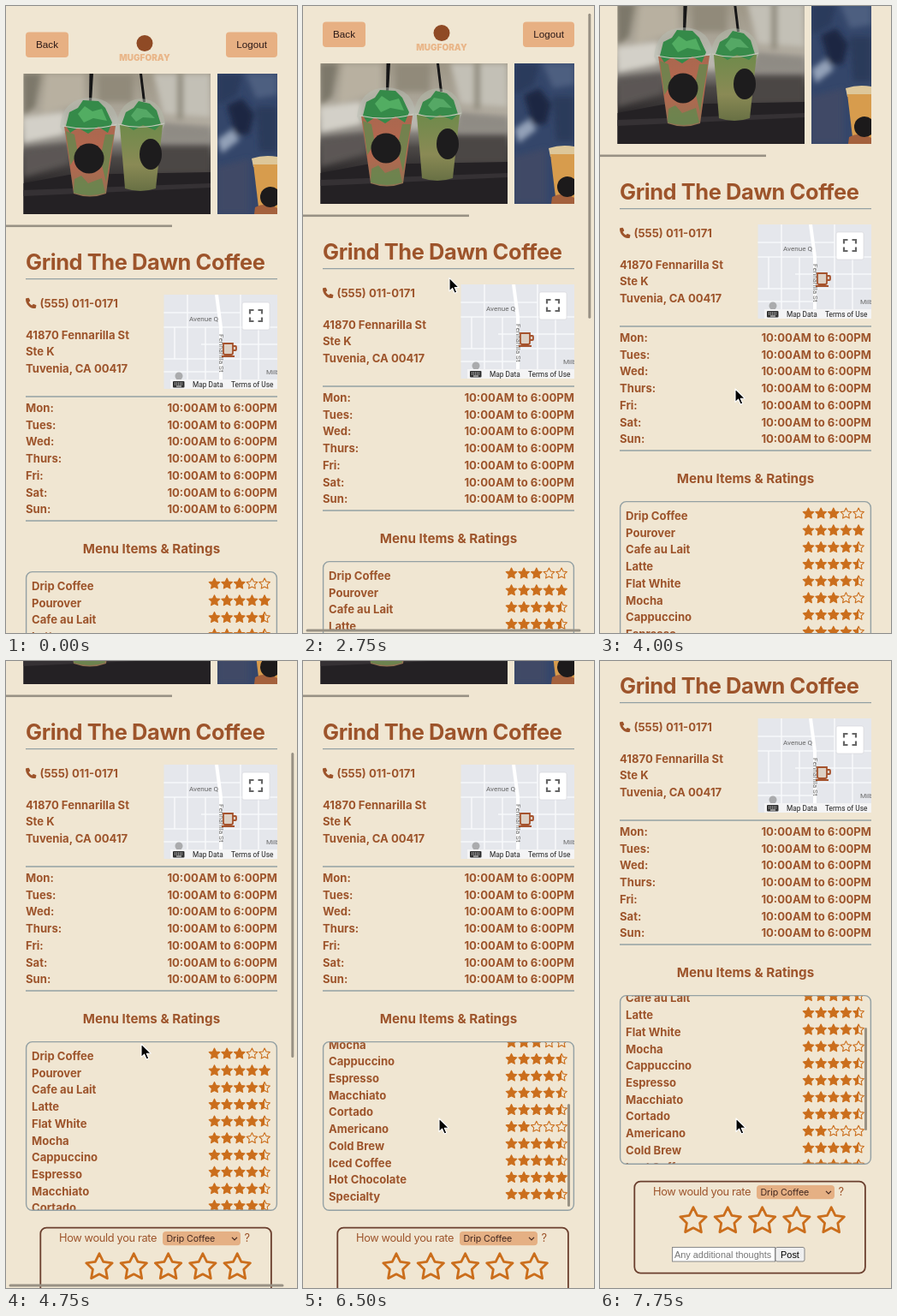
An HTML page for the animation above (8 s loop, 340 by 732 pixels).

```html
<!DOCTYPE html>
<html lang="en">
<head>
<meta charset="utf-8">
<title>Coffee shop page</title>
<style>
  html, body { margin: 0; width: 100%; height: 100%; overflow: hidden; background: #f0e6d2; }
  svg { display: block; width: 340px; height: 732px; }
  text { font: 700 13.1px Inter, sans-serif; fill: #9d542b; }
  .title { font-size: 25.4px; letter-spacing: -.4px; }
  .head { font-size: 15.2px; }
  .ask { font-weight: 400; font-size: 12.8px; letter-spacing: -.35px; }
  .form { font: 11.7px "Liberation Sans", Arial, sans-serif; fill: #2c1a18; }
  .small { font: 8.35px Roboto, sans-serif; fill: #222; }
  .road { font-size: 8.1px; fill: #666; }
  .mid { text-anchor: middle; }
  .end { text-anchor: end; }
  .rule { stroke: #93a0a3; stroke-width: 1.4; fill: none; }
  .bar { fill: #989184; }
</style>
</head>
<body>
<svg id="stage" viewBox="0 0 340 732"></svg>
<script>
const text = (x, y, s, cls = '', more = '') => `<text x="${x}" y="${y}" class="${cls}" ${more}>${s}</text>`;
const rect = (x, y, w, h, fill, more = '') => `<rect x="${x}" y="${y}" width="${w}" height="${h}" fill="${fill}" ${more}/>`;
const circle = (x, y, r, fill) => `<circle cx="${x}" cy="${y}" r="${r}" fill="${fill}"/>`;
const path = (d, fill, more = '') => `<path d="${d}" fill="${fill}" ${more}/>`;
const rule = y => path(`M23 ${y}H317`, 'none', 'class="rule"');
const clip = (id, shape) => `<clipPath id="${id}">${shape}</clipPath>`;

const ORANGE = '#cb6e1c';

// The first `points` corners of a star, starting at the top and going round by the left
function starPath(x, y, r, points = 10) {
  let d = '';
  for (let i = 0; i < points; i++) {
    const a = -Math.PI / 2 - i * Math.PI / 5, k = i % 2 ? r * .5 : r;
    d += (i ? 'L' : 'M') + (x + k * Math.cos(a)).toFixed(2) + ' ' + (y + k * Math.sin(a)).toFixed(2);
  }
  return d + 'Z';
}
function star(x, y, r, width, fill = 1) {
  const line = `stroke="${ORANGE}" stroke-width="${width}" stroke-linejoin="round"`;
  return path(starPath(x, y, r), fill === 1 ? ORANGE : 'none', line) +
    (fill === .5 ? path(starPath(x, y, r, 6), ORANGE) : '');
}

function photos() {
  const first = rect(20, 79, 219, 164, 'url(#cabin)') +
    '<g filter="url(#soft)">' +
    path('M20 79H40L34 118L20 128Z', '#7d786a') +
    path('M46 79H92V112L42 126Z', '#b8b0a0') +
    path('M108 79H148V112H108Z', '#918a7a') +
    path('M172 79H239V130L184 126Z', '#c3c0b6') +
    path('M200 79H207V132H200Z', '#8f8a7c') +
    path('M20 130L68 124V150L20 160Z', '#d3d0c8') +
    path('M122 130H138V156H122Z', '#b9b6ae') +
    path('M182 136L239 142V156H182Z', '#8f8b84') +
    path('M20 168L74 160V184L20 200Z', '#5b5755') +
    path('M174 164H239V196H174Z', '#4c4745') + '</g>' +
    path('M20 207L74 197L239 194V243H20Z', '#242124') +
    path('M20 215L239 207V212L20 222Z', '#353134') +
    path('M97.5 79H102L100 112H97Z', '#161617') +
    path('M156 79H159L163 112H160Z', '#161617') +
    path('M63 141Q66 108 98 107Q129 108 132 139L128 148H67Z', '#b7beb3', 'opacity=".5"') +
    path('M68 140L79 219Q98 226 117 219L128 140Z', 'url(#pink)') +
    path('M70 146L75 186L84 172L80 150ZM116 150L110 178L117 206L126 150ZM80 202L88 198L96 207L112 201L116 218Q98 224 79 218Z', '#5f8a4e', 'opacity=".75"') +
    path('M70 140L74 124L84 119L90 110L108 111L116 119L124 136L119 148L108 141L96 149L84 142L75 148Z', '#358a49') +
    path('M84 126L92 117L101 123L112 120L118 134L102 131L91 136Z', '#52ad62') +
    path('M66 140Q98 147 130 138', 'none', 'stroke="#c9cbc0" stroke-width="1.2"') +
    path('M129 139Q133 110 157 108Q182 109 186 137L182 146H133Z', '#b3bbac', 'opacity=".5"') +
    path('M133 139L139 213Q157 219 175 213L183 139Z', 'url(#olive)') +
    path('M135 138L140 124L149 119L155 111L168 114L176 122L181 138L174 145L160 139L149 145L141 140Z', '#388b4b') +
    path('M146 128L153 119L164 121L174 131L160 130L152 135Z', '#55a865') +
    path('M131 138Q157 145 185 137', 'none', 'stroke="#c6c9bb" stroke-width="1.2"') +
    circle(97, 178, 17.5, '#1d1c1d') + '<ellipse cx="169" cy="173" rx="13" ry="18" fill="#1d1c1d"/>';
  const second = rect(247, 79, 70, 164, '#34466a') +
    '<g filter="url(#soft)">' +
    path('M247 79H276L270 104L247 116Z', '#2a3a5c') +
    path('M280 79H317V104L292 108Z', '#4d5f80') +
    path('M258 116L276 108L290 126L284 150L268 150Z', '#1c2743') +
    path('M292 118H317V170H296Z', '#2c3a5a') +
    path('M247 156L264 144L273 156L252 172Z', '#93a1b8') +
    path('M247 188L284 178V243H247Z', '#3f4a66') + '</g>' +
    path('M287 178Q302 173 317 176V188H289Z', '#ddc79a') +
    path('M289 185H317V243H296Z', '#d79c4d') +
    path('M291 235Q304 228 317 236V243H290Z', '#a4613d') + circle(309, 223, 12, '#1c1a1b');
  return `<g clip-path="url(#p1)">${first}</g><g clip-path="url(#p2)">${second}</g>`;
}

function map() {
  const corner = (x, y, dx, dy) => `M${x} ${y + 4.5 * dy}V${y}H${x + 4.5 * dx}`;
  return '<g clip-path="url(#mapBox)">' + rect(184, 337, 133, 110, '#e5e7ec') +
    path('M184 358H274M184 375H317M184 412H317M228 395H317M212 337V447M233 375V437M274 337V447M295 375V437M197 375V412M184 427H250',
      'none', 'stroke="#f8f9fb" stroke-width="1.5"') +
    path('M246 337L251 375V447', 'none', 'stroke="#fff" stroke-width="4"') +
    circle(202, 432, 4.5, '#aaabad') +
    text(214, 368, 'Avenue Q', 'small road') +
    text(0, 0, 'Fennarilla St', 'small road', 'transform="translate(248.5 383) rotate(90)"') +
    text(304, 430, 'Milbren', 'small road') +
    path('M254 394H265V405Q265 407 263 407H256Q254 407 254 405ZM265 397H268Q269 397 269 398V401Q269 402 268 402H265M252 409H267',
      '#ddd0c4', 'stroke="#a5522c" stroke-width="1.8"') +
    rect(276, 346, 32, 32, '#fff', 'rx="2" stroke="#d5d6d8" stroke-width=".6"') +
    path(corner(285, 355, 1, 1) + corner(299, 355, -1, 1) + corner(285, 368, 1, -1) + corner(299, 368, -1, -1),
      'none', 'stroke="#666" stroke-width="2.2"') +
    rect(192, 436, 125, 11, '#f4f4f5') +
    rect(195, 438, 13.5, 7.5, '#333', 'rx="1"') +
    path('M197 440H207M197 442H207', 'none', 'stroke="#eee" stroke-dasharray="1 1"') +
    path('M199 444H205', 'none', 'stroke="#eee"') +
    text(218, 444.7, 'Map Data', 'small') + text(263, 444.7, 'Terms of Use', 'small') + '</g>';
}

const days = ['Mon', 'Tues', 'Wed', 'Thurs', 'Fri', 'Sat', 'Sun'];
const menu = ['Drip Coffee', 'Pourover', 'Cafe au Lait', 'Latte', 'Flat White', 'Mocha', 'Cappuccino', 'Espresso',
  'Macchiato', 'Cortado', 'Americano', 'Cold Brew', 'Iced Coffee', 'Hot Chocolate', 'Specialty'];
const ratings = { 'Drip Coffee': 3, Pourover: 5, Mocha: 3, Americano: 2, 'Hot Chocolate': 5 };

const hours = days.map((d, i) => {
  const y = 473.8 + i * 19.77;
  return text(23, y, d + ':') + text(317, y, '10:00AM to 6:00PM', 'end');
}).join('');

const items = menu.map((name, i) => {
  const y = 682 + i * 19.72, score = ratings[name] || 4.5;
  const stars = [0, 1, 2, 3, 4].map(k =>
    star(243.5 + k * 14.65, y - 7.3, 6.6, 1.1, Math.max(0, Math.min(1, score - k)))).join('');
  return text(30, y, name) + stars;
}).join('');

const header = rect(23, 30.5, 50, 29.5, '#e7b083', 'rx="4"') + text(48, 49.3, 'Back', 'form mid') +
  rect(257, 30.5, 60, 29.5, '#e7b083', 'rx="4"') + text(287, 49.3, 'Logout', 'form mid') +
  circle(162, 43.5, 9.5, '#8f4a25') +
  text(162, 63.6, 'MUGFORAY', 'mid', 'style="font-weight:900;font-size:10px;fill:#e9b689"');

const contact = text(23, 308.3, 'Grind The Dawn Coffee', 'title') + rule(318.6) +
  path('M2.9 .2L.6 .8Q0 1 0 1.6A10.4 10.4 0 0 0 10.4 12Q11 12 11.2 11.4L11.8 9.1Q11.9 8.4 11.4 8.2L8.8 7.1Q8.3 7 8 7.3L7 8.6A8 8 0 0 1 3.4 5L4.7 4Q5 3.7 4.9 3.2L3.8 .6Q3.5 .1 2.9 .2Z',
    '#9d542b', 'transform="translate(23 340.5) scale(1.05)"') +
  text(39.5, 351.6, '(555) 011-0171') + text(23, 388.5, '41870 Fennarilla St') +
  text(23, 408.3, 'Ste K') + text(23, 428, 'Tuvenia, CA 00417');

const form = rect(40.3, 877.6, 269.6, 107, 'none', 'rx="7" stroke="#6b3f2e" stroke-width="1.8"') +
  text(62, 893.6, 'How would you rate', 'ask') + text(278.5, 893.6, '?', 'ask') +
  rect(183, 882, 91, 16.3, '#e5b084', 'rx="4"') +
  text(187.5, 893.8, 'Drip Coffee', 'ask', 'style="font-size:10.7px;letter-spacing:-.1px;fill:#432820"') +
  path('M264 888.8L267 891.8L270 888.8', 'none', 'stroke="#432820" stroke-width="1.2"') +
  [0, 1, 2, 3, 4].map(k => star(109 + k * 40.3, 923.8, 16, 2.8, 0)).join('') +
  rect(84.5, 954.5, 120, 16.5, '#fff', 'stroke="#8a8a8a"') +
  text(87, 966.5, 'Any additional thoughts', 'form', 'style="font-size:10.9px;fill:#757575"') +
  rect(205, 954.5, 34, 16.5, '#efefef', 'rx="2" stroke="#858585"') +
  text(222, 966.5, 'Post', 'form mid', 'style="font-size:10.9px;fill:#000"');

const gradient = (id, ...stops) => `<linearGradient id="${id}" x2="0" y2="1">` +
  stops.map(([at, c]) => `<stop offset="${at}" stop-color="${c}"/>`).join('') + '</linearGradient>';

document.getElementById('stage').innerHTML = '<defs>' +
  gradient('cabin', [0, '#9d9686'], [.35, '#b0aa9e'], [.48, '#8d8983'], [.6, '#4c4846'], [.8, '#292628']) +
  gradient('pink', [0, '#a9684f'], [.5, '#b8674f'], [1, '#8f7252']) +
  gradient('olive', [0, '#6f8a4b'], [.6, '#8a8a55'], [1, '#687044']) +
  '<filter id="soft"><feGaussianBlur stdDeviation="3"/></filter>' +
  clip('p1', rect(20.5, 79, 218.5, 164)) + clip('p2', rect(247, 79, 70, 164)) +
  clip('mapBox', rect(184.5, 337, 132.5, 110)) + clip('menuBox', rect(24, 661, 292, 196, '', 'rx="6"')) + '</defs>' +
  '<g id="page">' + header + photos() + '<rect class="bar" x="0" y="255.5" width="194" height="2.6"/>' +
  contact + map() + rule(456) + hours + rule(601) + text(170, 639.3, 'Menu Items &amp; Ratings', 'head mid') +
  `<g clip-path="url(#menuBox)"><g id="list">${items}</g>` +
  '<rect id="listBar" class="bar" x="309" width="3" height="120" rx="1.5"/></g>' +
  rect(23.6, 660.6, 292.8, 196.6, 'none', 'rx="7" class="rule"') + form + '</g>' +
  '<g id="pageBars" class="bar"><rect id="pageBar" x="333.3" width="3" height="356" rx="1.5"/>' +
  '<rect x="3.5" y="727.6" width="321" height="3" rx="1.5"/></g>' +
  '<g id="cursor">' + path('M0 0V15.6L3.6 12.2L6.1 18L8.8 16.9L6.3 11.2H11.2Z', '#050505',
    'stroke="#fff" stroke-width="1.1" stroke-linejoin="round"') + '</g>';

// Keys are [time, value]
const scrollKeys = [[2500, 0], [2750, 12], [3000, 44], [3250, 70.5], [3500, 82], [4000, 82], [4250, 112],
  [4500, 186], [4750, 216], [6500, 216], [6750, 250], [7000, 270]];
const listKeys = [[5500, 0], [5750, 40], [6000, 95], [6250, 112], [7250, 112], [7500, 84], [7750, 53]];
const xKeys = [[1750, 186], [2250, 181], [2500, 181], [3250, 151], [3750, 158], [5000, 158], [5500, 159]];
const yKeys = [[1750, 256], [2250, 284], [2500, 284], [3250, 384], [3750, 447], [5000, 447], [5500, 534]];

function at(keys, t) {
  const i = keys.findIndex(k => k[0] > t);
  if (i < 0) return keys[keys.length - 1][1];
  if (!i) return keys[0][1];
  const [t0, a] = keys[i - 1], [t1, b] = keys[i];
  return a + (b - a) * (t - t0) / (t1 - t0);
}

const el = id => document.getElementById(id);
const move = (id, x, y) => el(id).setAttribute('transform', `translate(${x} ${y})`);
const show = (id, on) => el(id).setAttribute('visibility', on ? 'visible' : 'hidden');
const within = (t, ...spans) => spans.some(([a, b]) => t >= a && t < b);

function draw() {
  const t = Math.floor(performance.now() % 8000 / 250) * 250;
  const scroll = at(scrollKeys, t), list = at(listKeys, t);
  move('page', 0, -scroll);
  move('list', 0, -list);
  move('cursor', at(xKeys, t), at(yKeys, t));
  el('pageBar').setAttribute('y', 3 + scroll * .481);
  el('listBar').setAttribute('y', 666.5 + list * .593);
  show('cursor', t >= 1500);
  show('pageBars', within(t, [2750, 4000], [4250, 5500], [6750, 7500]));
  show('listBar', within(t, [5750, 7000], [7500, 8000]));
  requestAnimationFrame(draw);
}
draw();
</script>
</body>
</html>
```
